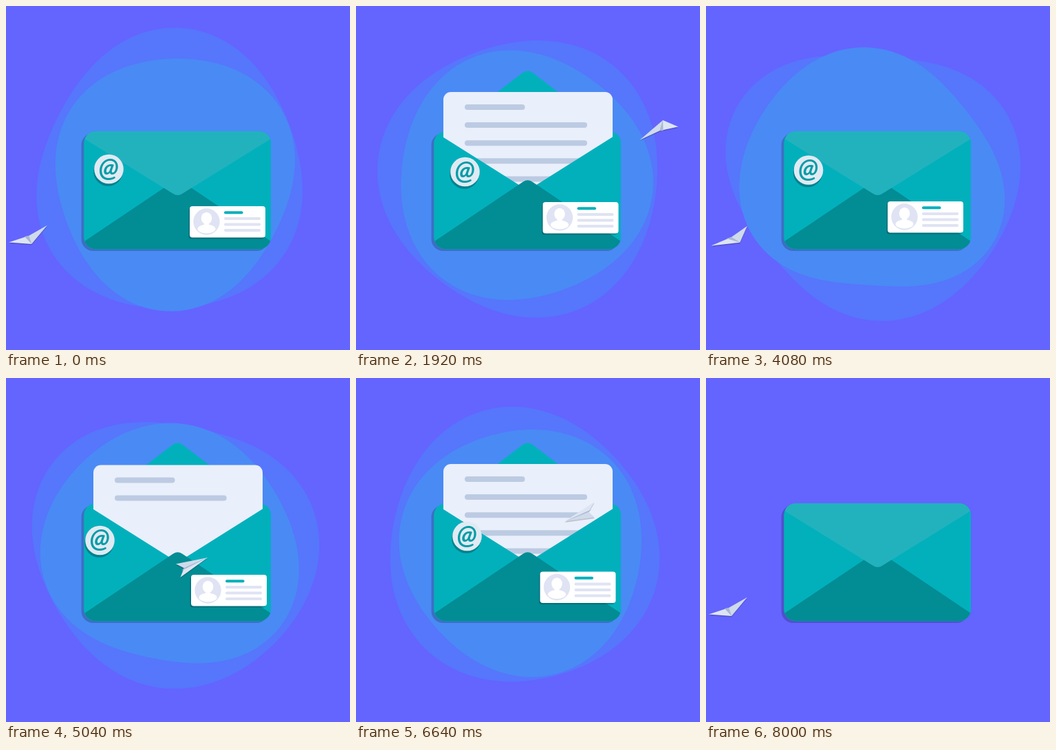
Animation of 500 by 500 pixels, one loop 8040 ms. Source, as an HTML page with a canvas:

```html
<!DOCTYPE html>
<html lang="en">
<head>
<meta charset="utf-8">
<title>Mail</title>
<style>
html, body { margin: 0; width: 100%; height: 100%; overflow: hidden; background: #6464ff; }
canvas { display: block; width: 100vw; height: 100vh; }
</style>
</head>
<body>
<canvas id="stage" width="500" height="500"></canvas>
<script>
const ctx = document.getElementById('stage').getContext('2d');
const { sin, cos, PI } = Math;
const LOOP = 8040, FLOAT = 8000, CYCLE = 4000;
const TEAL = '#02b0bc', DARK = '#028c94', SHADE = 'rgba(0,0,0,.2)', PALE = '#dfe3f3';

// Way points of the two floating labels and the times they are passed
const TIMES = [0, 1920, 3120, 4080, 5040, 6640, FLOAT];
const BADGE = [[149.5, 237], [158.5, 241], [155, 243], [149, 238.5], [136.5, 236], [161.5, 230]];
const CARD = [[267, 291], [271.5, 285], [270.5, 281], [264, 284], [269, 286], [267.5, 281.5]];

const ramp = (t, from, to) => Math.min(1, Math.max(0, (t - from) / (to - from)));
const ease = p => p < .5 ? 4 * p ** 3 : 1 - 4 * (1 - p) ** 3;

// Closed Catmull-Rom path through the way points
function drift(points, t) {
  const n = points.length;
  const i = Math.max(0, TIMES.findIndex(end => t < end) - 1);
  const u = ramp(t, TIMES[i], TIMES[i + 1]);
  return [0, 1].map(axis => {
    const [a, b, c, d] = [n - 1, 0, 1, 2].map(k => points[(i + k) % n][axis]);
    return b + u / 2 * (c - a + u * (2 * a - 5 * b + 4 * c - d + u * (3 * (b - c) + d - a)));
  });
}

function fill(color) {
  ctx.fillStyle = color;
  ctx.fill();
}
function poly(color, ...points) {
  ctx.beginPath();
  for (const [x, y] of points) ctx.lineTo(x, y);
  ctx.closePath();
  fill(color);
}
function box(color, x, y, w, h, r) {
  ctx.beginPath();
  ctx.roundRect(x, y, w, h, r);
  fill(color);
}
function disc(color, x, y, rx, ry = rx) {
  ctx.beginPath();
  ctx.ellipse(x, y, rx, ry, 0, 0, 7);
  fill(color);
}
// Triangle with a rounded tip above or below a base strip
function wedge(color, baseY, tipY, edgeY) {
  ctx.beginPath();
  ctx.moveTo(114, edgeY);
  ctx.lineTo(114, baseY);
  ctx.arcTo(249.5, tipY, 385, baseY, 12);
  ctx.lineTo(385, baseY);
  ctx.lineTo(385, edgeY);
  fill(color);
}
function bodyPath() {
  ctx.beginPath();
  ctx.roundRect(113.5, 182.3, 271.5, 170.9, 17);
}

// Wobbling outline; a negative scale turns it half way round
function blob(color, scale, t) {
  const c = cos(2 * PI * t / FLOAT), s = sin(2 * PI * t / FLOAT), points = [];
  for (let a = 0; a < 2 * PI; a += PI / 60) {
    const r = scale * (200 - 2 * c + 2 * s
      - c * (3 * cos(a) + 4 * sin(a))
      + (2 - 8 * c) * cos(2 * a) + (2.5 - 5 * c - 1.5 * s) * sin(2 * a)
      - (.8 + 6.5 * s) * cos(3 * a) + (11 * c - 2 * s - 2) * sin(3 * a));
    points.push([242 + r * cos(a), 248.5 + r * sin(a)]);
  }
  poly(color, ...points);
}

function letter(t) {
  const lift = ease(ramp(t, 560, 1139)) - ease(ramp(t, 2850, 3350));
  const top = 125 + 76 * (1 - lift);
  box('#e9effb', 127, top, 246, 340 - top, [11, 11, 0, 0]);
  for (let i = 0; i < 5; i++) {
    const start = 710 + 170 * i;
    const p = 1 - (1 - ramp(t, start, start + 200)) ** 1.5;
    if (p > 0) box('#bccbe2', 158, top + 18 + 26.1 * i, Math.max(8, (i ? 178 : 87.5) * p), 8, 4);
  }
}

function envelope(t) {
  const open = ease(ramp(t, 200, 600)) - ease(ramp(t, 3290, 3690));
  const tip = 277 - 185.5 * open, base = 193 + 2 * open;
  box(SHADE, 109.5, 185, 272, 171, 17);
  bodyPath();
  fill(TEAL);
  if (tip < base) wedge(TEAL, base, tip, base);
  if (open > 0) letter(t);
  ctx.save();
  bodyPath();
  ctx.clip();
  poly(TEAL, [113, 182], [249.5, 268], [386, 182], [386, 354], [113, 354]);
  wedge(DARK, 342, 251, 354);
  if (tip >= base) wedge('#22b2be', base, tip, 182);
  ctx.restore();
}

// A flat glider circling on a tilted plane
function plane(t) {
  const turn = PI + 2 * PI * t / CYCLE;
  const heading = turn + PI / 2 + .5 * sin(2 * turn);
  const nose = [1, 0], left = [0, .65], right = [0, -.65], fold = [.2, 0], keel = [.1, -.13];
  const pose = drop => {
    ctx.setTransform(43, -19, -5, -15,
      237 + 205 * cos(turn), 256 - 75 * cos(turn) - 29 * sin(turn) + drop);
    ctx.rotate(heading);
  };
  pose(1.5);
  poly(SHADE, nose, left, fold, right);
  pose(0);
  poly('#cfdaea', nose, left, fold);
  poly('#dde5f3', nose, right, fold);
  poly('#a9b9d2', nose, fold, keel);
  ctx.resetTransform();
}

function badge([x, y]) {
  disc('rgba(0,60,70,.4)', x - 1, y + 3.5, 21.3);
  disc('#e0eaf3', x, y, 21.3);
  ctx.fillStyle = '#029ca6';
  ctx.font = 'italic 700 38px Lato, "Open Sans", sans-serif';
  const m = ctx.measureText('@');
  ctx.fillText('@', x + (m.actualBoundingBoxLeft - m.actualBoundingBoxRight) / 2,
    y + (m.actualBoundingBoxAscent - m.actualBoundingBoxDescent) / 2);
}

function card([x, y]) {
  ctx.save();
  ctx.translate(x, y);
  box('rgba(0,40,60,.3)', -1.5, 2, 110, 45.5, 4);
  box('#fff', 0, 0, 110, 45.5, 4);
  disc(PALE, 24.5, 22.5, 19.2);
  disc('#fff', 24.5, 17.5, 7.8, 8.8);
  disc('#fff', 24.5, 33, 13, 6.5);
  box('#fff', 21, 24, 7, 6, 0);
  box(TEAL, 50, 7.2, 27.5, 4, 2);
  for (let i = 0; i < 3; i++) box(PALE, 50, 16 + 8.5 * i, 53, 4, 2);
  ctx.restore();
}

function frame(now) {
  const t = now % LOOP, phase = t % CYCLE, floating = t < FLOAT;
  ctx.fillStyle = '#6464ff';
  ctx.fillRect(0, 0, 500, 500);
  if (floating) {
    blob('#5676fc', 1, t);
    blob('#4a8af5', -.9, t);
  }
  envelope(phase);
  if (floating) card(drift(CARD, t));
  plane(phase);
  if (floating) badge(drift(BADGE, t));
  requestAnimationFrame(frame);
}
requestAnimationFrame(frame);
</script>
</body>
</html>
```
